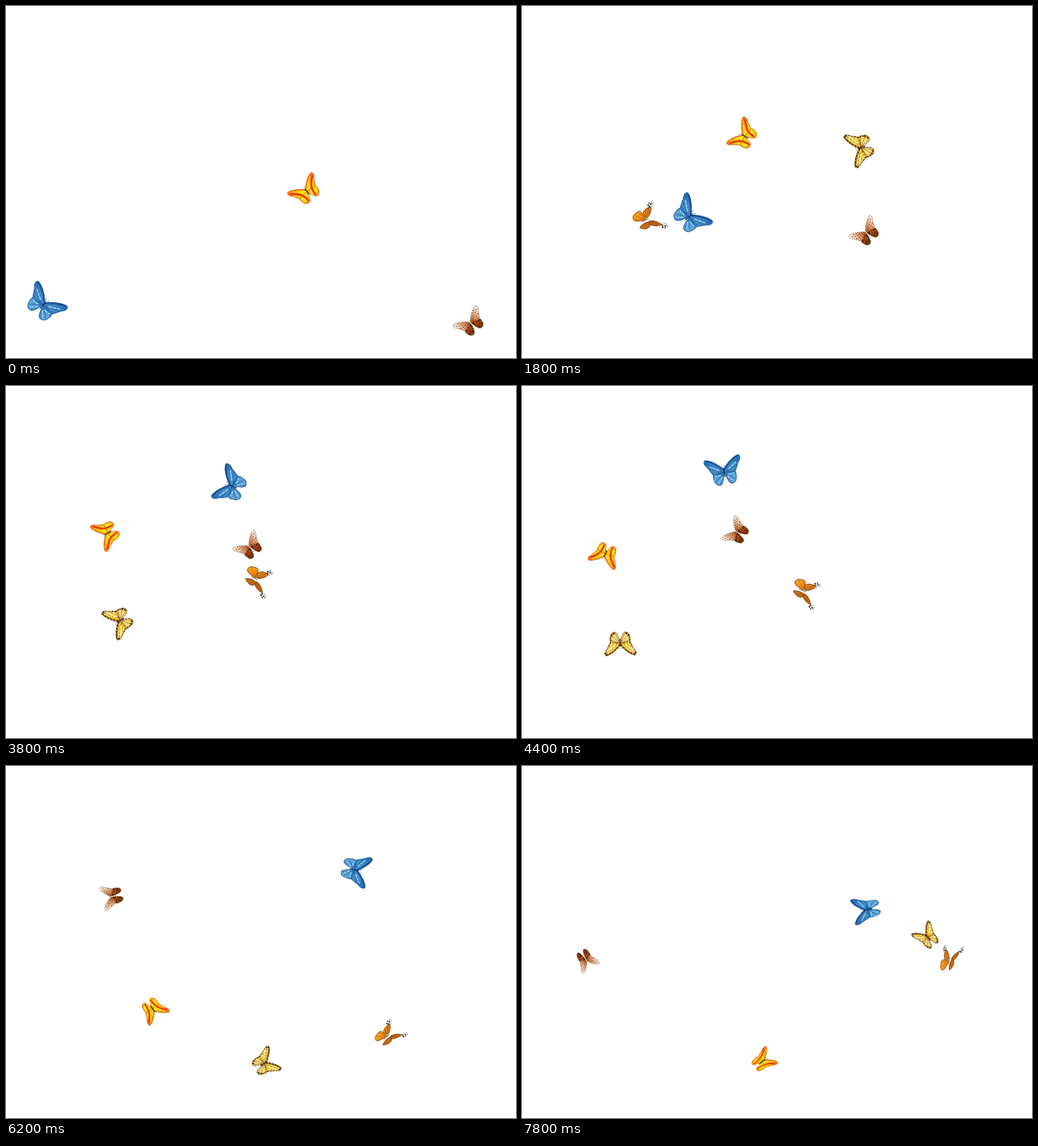
Recreate the animation shown at these times as an HTML page with a canvas. Size 700x484 px, loop 8 s.

```html
<!DOCTYPE html>
<html lang="en">
<head>
<meta charset="utf-8">
<title>Butterflies</title>
<style>
html, body { margin: 0; width: 100%; height: 100%; overflow: hidden; background: #fff; }
canvas { display: block; width: 100%; height: 100%; }
</style>
</head>
<body>
<canvas id="stage" width="700" height="484"></canvas>
<script>
const ctx = document.getElementById('stage').getContext('2d');
const LOOP = 8000, STEP = 200, LEG = 1000;

// Wings in body coordinates: x points ahead, y sideways.
const FORE = 'M3 0C10 5 18 16 20 25C20 29 15 29 12 26C8 22 3 21 -2 17L0 1Z';
const HIND = 'M1 1L-1 16C-4 20 -8 17 -11 17C-15 16 -17 13 -17 9C-16 4 -7 2 1 1Z';
const SMALL_FORE = 'M3 2C8 3 14 8 17 15C11 18 4 16 0 11Z';
const THIN_FORE = 'M4 4C10 5 16 11 20 18C12 18 6 14 3 9Z';
const THIN_HIND = 'M3 5C5 10 2 14 -5 13C-9 12 -12 9 -14 7C-8 3 -2 3 3 5Z';
const FORE_VEINS = 'M0 1L16 26M1 5L7 22M3 2L18 22M0 4L1 18';
const HIND_VEINS = 'M0 2L-5 17M-1 2L-12 15M-2 2L-16 9';
const LEADING_EDGE = 'M3 0C10 5 18 16 20 26';
const HIND_RIM = 'M-3 18L-11 17L-17 9';

// "flight" holds one waypoint per second.
const butterflies = [
  {
    size: 1, fore: ['#62b0e0', '#2a72b6'], hind: ['#3d88c6', '#84c2e8'], edge: '#1a5596', body: '#0c3870',
    marks: [[FORE_VEINS, '#2668ab', 1.1], [HIND_VEINS, '#2e78b8', 1.2],
      ['M3 7L11 21M-4 6L-4 15M-6 4L-13 10', '#a9dcf4', 1.5, [5, 1]], [LEADING_EDGE, '#164a90', 3.5]],
    flight: [[51, 411], [137, 345], [256, 274], [410, 182], [290, 130], [299, 112], [452, 136], [552, 173], [458, 201]]
  },
  {
    size: .8, fore: ['#ffe914', '#ffb408'], hind: ['#ffd800', '#fff018'], edge: '#c8540c', body: '#4a2205',
    marks: [['M14 29L22 22', '#fb7c10', 9], ['M-15 8Q-2 8 4 13T15 25', '#f0300c', 3.4],
      ['M3 0Q12 8 16 18', '#ff8a0a', 2.4], [HIND_RIM, '#ff9a00', 2.4]],
    flight: [[413, 255], [358, 212], [291, 174], [208, 176], [128, 211], [116, 264], [186, 315], [266, 418], [340, 402]]
  },
  {
    size: .76, fore: ['#c65e1c', '#fff6ea'], hind: ['#a24a10', '#6a2406'], edge: '#4a2610', body: '#d8c9a8',
    dash: [2, 1.6],
    marks: [[FORE_VEINS, '#50301c', 1.3, [2, 3]], ['M3 10L17 25', '#ef8a3c', 2, [2, 4]],
      [HIND_VEINS, '#32120a', 1.7, [3, 2]], ['M-6 5L-7 15M-3 6L-2 14', '#ea7424', 2, [2, 2.5]]],
    flight: [[639, 437], [545, 364], [457, 302], [383, 261], [323, 214], [252, 188], [167, 175], [72, 214], [92, 274]]
  },
  {
    size: .87, fore: ['#ffe23c', '#f4d878'], hind: ['#fff6bc', '#f0c428'], edge: '#5c330a', body: '#4a2408',
    dash: [4, 1],
    marks: [[FORE_VEINS, '#a36d18', 1, [4, 2]], ['M3 9L12 23', '#fffbe0', 2, [5, 2]],
      [LEADING_EDGE, '#55300c', 4, [4, 1.5]], ['M-2 17L12 27L20 26', '#5a310d', 3, [3, 2]],
      [HIND_VEINS, '#a8721a', 1], [HIND_RIM, '#5f300a', 3.4, [3, 1.5]]],
    flight: [[800, 64], [616, 138], [429, 209], [253, 282], [144, 332], [159, 384], [304, 425], [572, 296], [549, 227]]
  },
  {
    size: .86, fore: ['#f09420', '#d8640c'], hind: ['#ee8414', '#ffb81e'], edge: '#74400e', body: '#a89878',
    spotted: true,
    marks: [['M1 2L14 16M2 3L7 16M4 3L14 11', '#a8520c', .9], [HIND_VEINS, '#c46c14', .9]],
    flight: [[-45, 365], [75, 326], [192, 287], [292, 254], [355, 270], [434, 306], [511, 375], [560, 320], [590, 260]]
  }
];

// Smooth curve through evenly timed waypoints.
function positionAt(flight, time) {
  const last = flight.length - 1;
  const i = Math.max(0, Math.min(Math.floor(time / LEG), last - 1));
  const u = time / LEG - i;
  const before = flight[Math.max(i - 1, 0)], after = flight[Math.min(i + 2, last)];
  return [0, 1].map(axis => {
    const a = flight[i][axis], b = flight[i + 1][axis];
    const leave = (b - before[axis]) / 2, arrive = (after[axis] - a) / 2;
    const glide = a + (b - a) * u * u * (3 - 2 * u);
    return glide + u * (1 - u) * ((1 - u) * leave - u * arrive);
  });
}

// Faces along the flight, tilted further up while climbing.
function headingAt(flight, time) {
  const [x0, y0] = positionAt(flight, time - 40);
  const [x1, y1] = positionAt(flight, time + 40);
  const rise = y1 - y0;
  return Math.atan2(rise < 0 ? rise * 1.5 : rise, x1 - x0);
}

function line(path, color, width, dash = []) {
  ctx.strokeStyle = color;
  ctx.lineWidth = width;
  ctx.setLineDash(dash);
  ctx.stroke(new Path2D(path));
}

function paintWing(shape, colors, kind) {
  const shade = ctx.createRadialGradient(0, 0, 3, 0, 0, 30);
  shade.addColorStop(0, colors[0]);
  shade.addColorStop(1, colors[1]);
  const path = new Path2D(shape);
  ctx.fillStyle = shade;
  ctx.fill(path);
  ctx.save();
  ctx.clip(path);
  kind.marks.forEach(mark => line(...mark));
  ctx.restore();
  line(shape, kind.edge, 1, kind.dash);
}

function paintSide(kind, side, opening) {
  const far = kind.spotted && side > 0;
  ctx.save();
  ctx.scale(1, side * opening);
  if (far) {
    paintWing(THIN_HIND, ['#b8620f', '#d97a16'], kind);
    paintWing(THIN_FORE, ['#c0600f', '#c9650e'], kind);
  } else {
    paintWing(HIND, kind.hind, kind);
    paintWing(kind.spotted ? SMALL_FORE : FORE, kind.fore, kind);
  }
  if (kind.spotted) {
    if (far) ctx.translate(5, 3);
    line('M14 16L22 22M13 19L18 23', '#33332f', 2.2, [3, 1.5]);
    line('M18 15L23 19', '#6a675c', 1.3, [2, 2]);
  }
  ctx.restore();
}

function paintButterfly(kind, time) {
  const opening = 1 - .38 * (time / LOOP) ** 2;
  ctx.save();
  ctx.translate(...positionAt(kind.flight, time));
  ctx.rotate(headingAt(kind.flight, time));
  ctx.scale(kind.size, kind.size);
  paintSide(kind, -1, opening);
  paintSide(kind, 1, opening);
  line('M-7 0L5 0', kind.body, 1.6);
  if (!kind.spotted) line('M5 0L10 -3M5 0L10 3', kind.body, .7, [2, 1]);
  ctx.restore();
}

function draw(now) {
  const time = Math.floor(now % LOOP / STEP) * STEP;
  ctx.fillStyle = '#fff';
  ctx.fillRect(0, 0, 700, 484);
  butterflies.forEach(kind => paintButterfly(kind, time));
}

let start;
function tick(now) {
  start ??= now;
  draw(now - start);
  requestAnimationFrame(tick);
}
draw(0);
requestAnimationFrame(tick);
</script>
</body>
</html>
```
